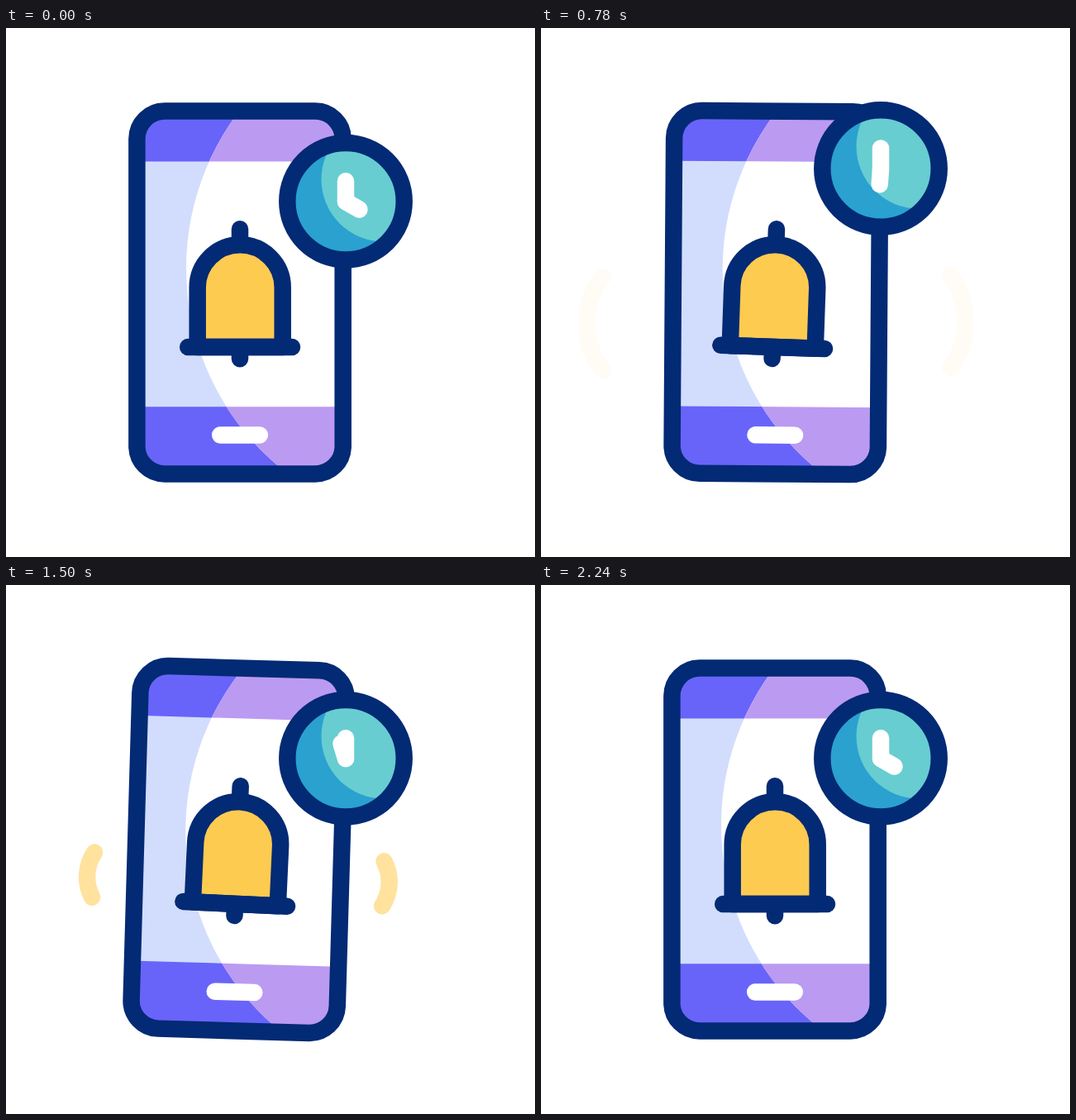
An HTML page that plays this animation: 640 px wide and 640 px high, repeating every 2.4 s.

```html
<!DOCTYPE html>
<html lang="en">
<head>
<meta charset="utf-8">
<title>Phone alarm</title>
<style>
  html, body { margin: 0; height: 100%; overflow: hidden; background: #fff; }
  svg { display: block; width: 100vw; height: 100vh; }
  .line { fill: none; stroke: #032a74; stroke-width: 20.5; stroke-linecap: round; stroke-linejoin: round; }
  .white { stroke: #fff; }
  .wave { stroke: #ffcc52; }
</style>
</head>
<body>
<svg viewBox="0 0 640 640">
  <defs>
    <clipPath id="screen"><rect x="158.4" y="100.6" width="249.3" height="438.8" rx="33.5"/></clipPath>
    <clipPath id="dial"><circle cx="411" cy="209.7" r="70.7"/></clipPath>
    <clipPath id="glare"><circle cx="531" cy="290.5" r="313"/></clipPath>
  </defs>

  <g id="phone">
    <g id="outer" class="line wave">
      <path d="M72.5 303.3A91 91 0 0 0 74 415.2"/>
      <path d="M493.5 297.3A95 95 0 0 1 494.7 409.4"/>
    </g>
    <g id="inner" class="line wave">
      <path d="M108.7 328.7A53 53 0 0 0 107.3 382.8"/>
      <path d="M459.3 329.2A53 53 0 0 1 458.4 383.3"/>
    </g>
    <g clip-path="url(#screen)">
      <path fill="#d2ddfd" d="M150 90H420V550H150Z"/>
      <path fill="#6864f9" d="M150 90H420V161.5H150ZM150 458.3H420V550H150Z"/>
      <g clip-path="url(#glare)">
        <path fill="#fff" d="M150 90H420V550H150Z"/>
        <path fill="#bb9af2" d="M150 90H420V161.5H150ZM150 458.3H420V550H150Z"/>
      </g>
    </g>
    <rect class="line" x="158.4" y="100.6" width="249.3" height="438.8" rx="33.5"/>
    <path class="line white" d="M259.2 492.5H306.8"/>
    <g id="bell">
      <path class="line" d="M283 243.3V262M283 386V400.2"/>
      <path class="line" style="fill:#fdcb50" d="M231.7 386V313.8a51.5 51.5 0 0 1 103 0V386Z"/>
      <path class="line" d="M220.2 386H346"/>
    </g>
  </g>

  <g id="clock">
    <g clip-path="url(#dial)">
      <circle cx="411" cy="209.7" r="71" fill="#2aa1cf"/>
      <circle cx="457" cy="183" r="75.5" fill="#67cdd1"/>
    </g>
    <circle class="line" cx="411" cy="209.7" r="70.7"/>
    <path class="line white" d="M411 185.3V210"/>
    <path id="hand" class="line white" d="M411 210V191"/>
  </g>
</svg>
<script>
const LOOP = 2400, STEP = 20, START = 200;
const PULSE = 595, FADE = 197;
const part = id => document.getElementById(id);
const [phone, bell, clock, hand, inner, outer] =
  ['phone', 'bell', 'clock', 'hand', 'inner', 'outer'].map(part);

// Each track is a list of [time, value] pairs joined by straight lines.
const tilt  = [[200, 0], [605, 2.85], [1010, -2.85], [1415, 2.85], [1820, -2.85], [2225, 0]];
const shift = [[200, 0], [605, 2.35], [1820, 2.35], [2225, 0]];
const swing = [[200, 0], [570, -15], [950, 15], [1320, -12], [1680, 14], [2045, 0]];
const lift  = [[200, 0], [795, -40.8], [1180, 0]];
const turn  = [[200, 0], [350, 7], [500, 21.5], [640, 41], [780, 64], [980, 105],
               [1180, 150], [1500, 223], [1920, 322], [2060, 348], [2240, 360]];

function at(track, t) {
  if (t <= track[0][0]) return track[0][1];
  for (let i = 1; i < track.length; i++) {
    const [t0, v0] = track[i - 1], [t1, v1] = track[i];
    if (t < t1) return v0 + (v1 - v0) * (t - t0) / (t1 - t0);
  }
  return track[track.length - 1][1];
}

const pulse = (age, peak) => Math.max(0, 1 - Math.abs(age - peak) / FADE);
const set = (el, transform) => el.setAttribute('transform', transform);

function draw(t) {
  set(phone, `translate(${at(shift, t)}) rotate(${at(tilt, t)} 283 187)`);
  set(bell, `rotate(${at(swing, t)} 283 243.3)`);
  set(clock, `translate(0 ${at(lift, t)})`);
  set(hand, `rotate(${120 + at(turn, t)} 411 210)`);

  const age = t - START;
  const wave = age >= 0 && age < 3 * PULSE ? age % PULSE : 0;
  inner.setAttribute('opacity', pulse(wave, FADE));
  outer.setAttribute('opacity', pulse(wave, 2 * FADE));
}

const begin = performance.now();
function tick() {
  const t = (performance.now() - begin) % LOOP;
  draw(Math.floor(t / STEP) * STEP);
  requestAnimationFrame(tick);
}
draw(0);
tick();
</script>
</body>
</html>
```
